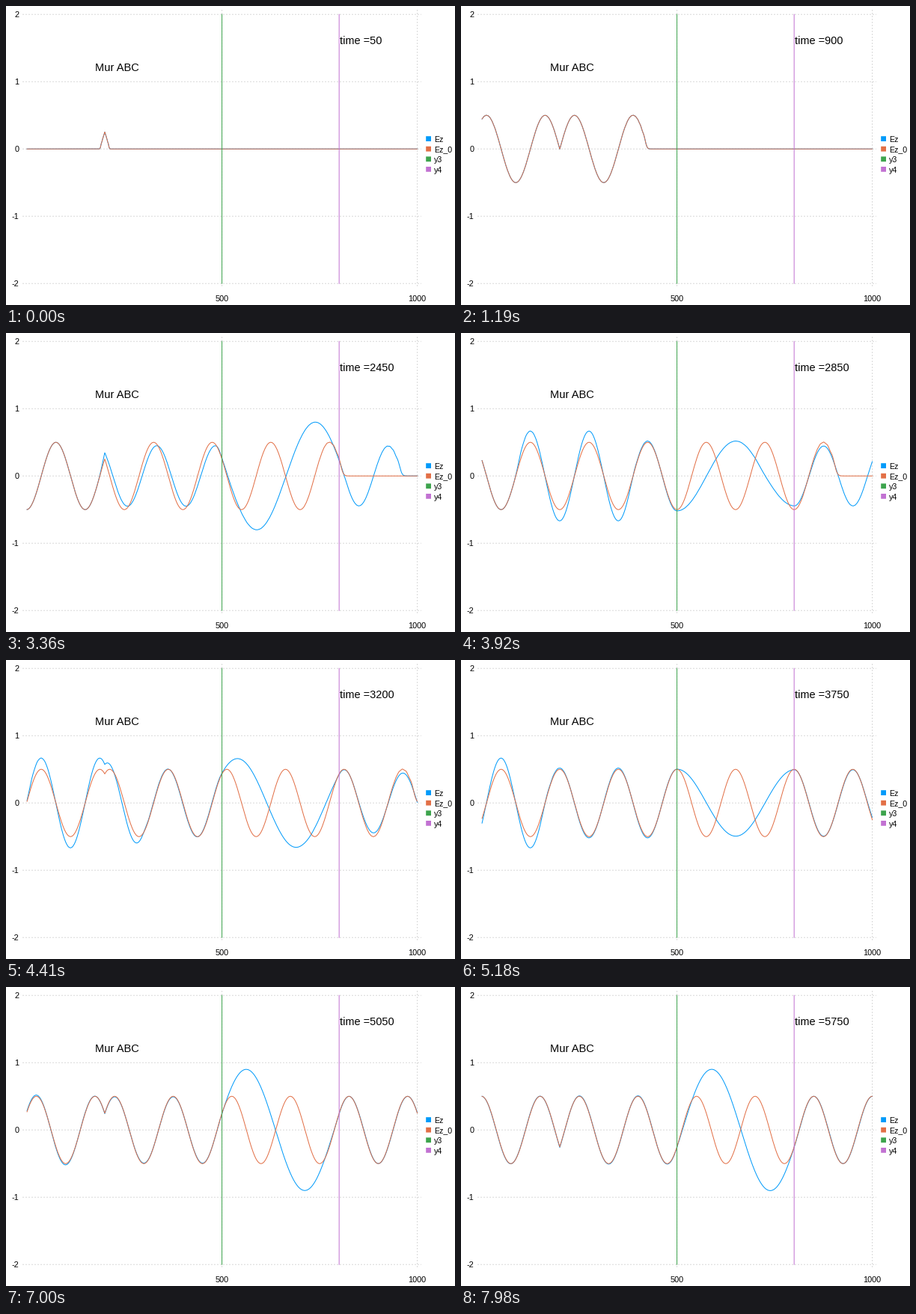
A matplotlib script that plays this animation: 600x400 px, repeating every 8000 ms.

```python
import numpy as np
import matplotlib.pyplot as plt
from matplotlib.animation import FuncAnimation
from matplotlib.patches import Rectangle

W, H, DPI = 600, 400, 100
PT = 72 / DPI
LOOP, TICK, HOLD = 8000, 20, 70
STEPS_PER_SHOT, SHOTS = 50, 115
N, SRC, PERIOD, S = 1000, 199, 600, 0.25
BLUE, ORANGE, GREEN, PURPLE = "#009afa", "#e26f46", "#3da44d", "#c271d2"

plt.rcParams["font.family"] = "Liberation Sans"


def simulate():
    """1D FDTD with Mur boundaries: row 0 has the slab, row 1 is uniform."""
    e, h = np.zeros((2, N)), np.zeros((2, N - 1))
    ce = np.full((2, N), S)
    ce[0, 499:800] = 1.0
    mur = (S - 1) / (S + 1)
    shots = []
    for n in range(1, SHOTS * STEPS_PER_SHOT + 1):
        old = e.copy()
        h += S * np.diff(e)
        e[:, 1:-1] += ce[:, 1:-1] * np.diff(h)
        e[:, SRC] += S * np.sin(2 * np.pi * n / PERIOD)
        e[:, 0] = old[:, 1] + mur * (e[:, 1] - old[:, 0])
        e[:, -1] = old[:, -2] + mur * (e[:, -2] - old[:, -1])
        if n % STEPS_PER_SHOT == 0:
            shots.append(e.copy())
    return shots


def px(x):
    return 28.1 + (x - 1) * 0.522


def py(y):
    return 191.25 - 90 * y


fig = plt.figure(figsize=(W / DPI, H / DPI), dpi=DPI, facecolor="white")
ax = fig.add_axes([0, 0, 1, 1])
ax.set_xlim(0, W)
ax.set_ylim(H, 0)
ax.axis("off")


def line(xs, ys, color, **kw):
    return ax.plot(xs, ys, color=color, lw=PT, snap=False, **kw)[0]


def label(x, y, text, size, ha="left"):
    return ax.text(x, y, text, fontsize=size * PT, ha=ha, va="baseline")


grid = dict(color="#d9d9d9", dashes=(2, 2))
for v in (-2, -1, 0, 1, 2):
    line([22, 555], [py(v)] * 2, **grid)
    label(17.3, py(v) + 4.2, str(v), 10.9, "right")
for v in (500, 1000):
    line([px(v)] * 2, [5, 377], **grid)
    label(px(v), 395, str(v), 10.9, "center")

xs = px(np.arange(1, N + 1))
ez = line(xs, xs * 0, BLUE)
ez0 = line(xs, xs * 0, ORANGE)
for v, color in ((500, GREEN), (800, PURPLE)):
    line([px(v)] * 2, [py(2), py(-2)], color)

label(119.3, 86.7, "Mur ABC", 14.6)
clock = label(445.8, 51, "", 14.5)

names = ("Ez", "Ez_0", "y3", "y4")
for i, (name, color) in enumerate(zip(names, (BLUE, ORANGE, GREEN, PURPLE))):
    y = 177.6 + 13.6 * i
    ax.add_patch(Rectangle((561.2, y - 3.4), 6.8, 6.8, fc=color, ec="none",
                           snap=False))
    label(572.4, y + 4.2, name, 10.6)

shots = simulate()


def update(i):
    k = min((i * TICK + TICK // 2) // HOLD, SHOTS - 1)
    slab, free = shots[k]
    ez.set_ydata(py(slab))
    ez0.set_ydata(py(free))
    clock.set_text(f"time ={(k + 1) * STEPS_PER_SHOT}")
    return ez, ez0, clock


def reset():
    return update(0)


anim = FuncAnimation(fig, update, frames=LOOP // TICK, interval=TICK,
                     init_func=reset, repeat=True, repeat_delay=0, blit=False)
plt.show()
```
